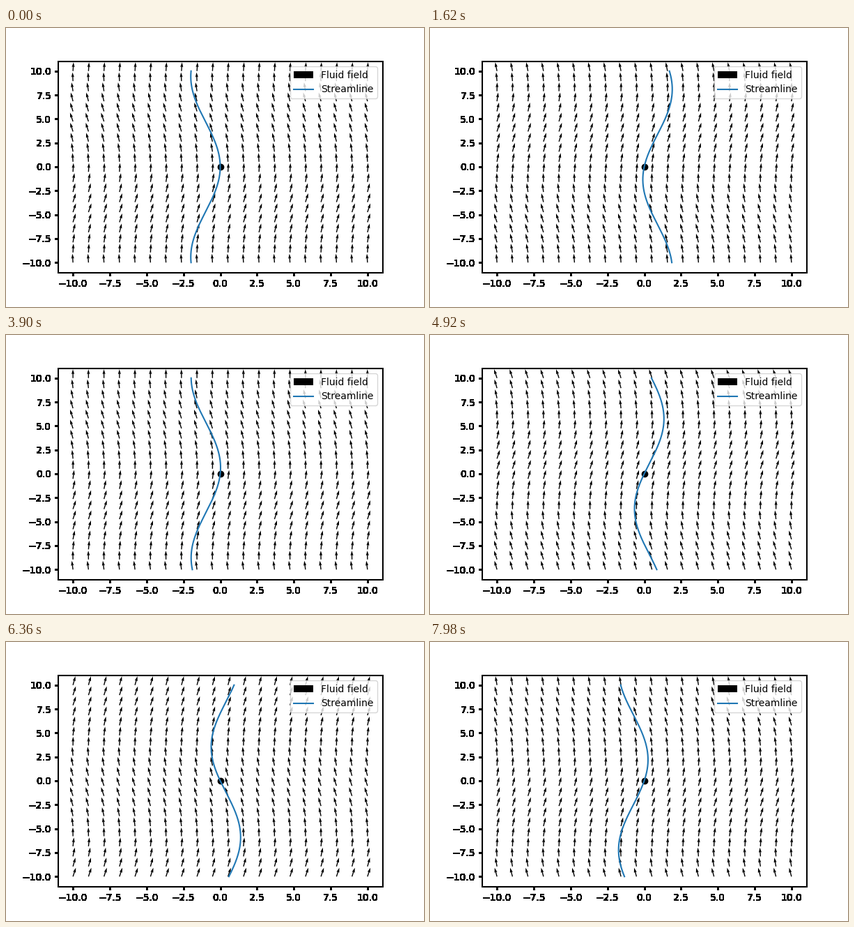
Recreate the animation shown at these times as a matplotlib script. Size 600 by 400 pixels, loop 8 s.

```python
import numpy as np
import matplotlib.pyplot as plt
from matplotlib.animation import FuncAnimation

INTERVAL = 20       # ms per drawn frame
FRAMES = 400
HOLD = 3            # drawn frames per time step
STEP = 0.1          # phase gained per time step
K = 1 / 3           # wave number of the field


def flow(y, phase):
    return -K * np.sin(K * y - phase), np.ones_like(y)


def streamline(y, phase):
    return np.cos(K * y - phase) - np.cos(phase)


fig = plt.figure(figsize=(6, 4), dpi=100)
fig.subplots_adjust(left=0.125, right=0.9, bottom=0.125, top=0.88)
ax = fig.add_subplot()

side = np.linspace(-10, 10, 20)
gx, gy = np.meshgrid(side, side)
ys = np.linspace(-10, 10, 201)

field = ax.quiver(gx, gy, *flow(gy, 0), label="Fluid field")
line, = ax.plot(streamline(ys, 0), ys, label="Streamline")
ax.scatter(0, 0, color="black")
ax.set(xlim=(-11, 11), ylim=(-11, 11))
ax.legend(loc="upper right")


def harden_axis():
    """Draw the ticks and labels once on a clear page and drop the alpha,
    which leaves them heavy and hard-edged, then keep that as a backdrop."""
    fig.patch.set_alpha(0)
    fig.canvas.draw()
    page = np.array(fig.canvas.buffer_rgba())
    rgb = np.where(page[..., 3:] > 0, page[..., :3], 255).astype(np.uint8)
    fig.patch.set_alpha(1)
    fig.figimage(rgb, 0, 0, origin="upper", zorder=-1)
    ax.xaxis.set_visible(False)
    ax.yaxis.set_visible(False)


def update(n):
    phase = STEP * (n // HOLD)
    field.set_UVC(*flow(gy, phase))
    line.set_xdata(streamline(ys, phase))
    return field, line


harden_axis()
anim = FuncAnimation(fig, update, frames=FRAMES, interval=INTERVAL,
                     repeat=True, repeat_delay=0, blit=False)
plt.show()
```
